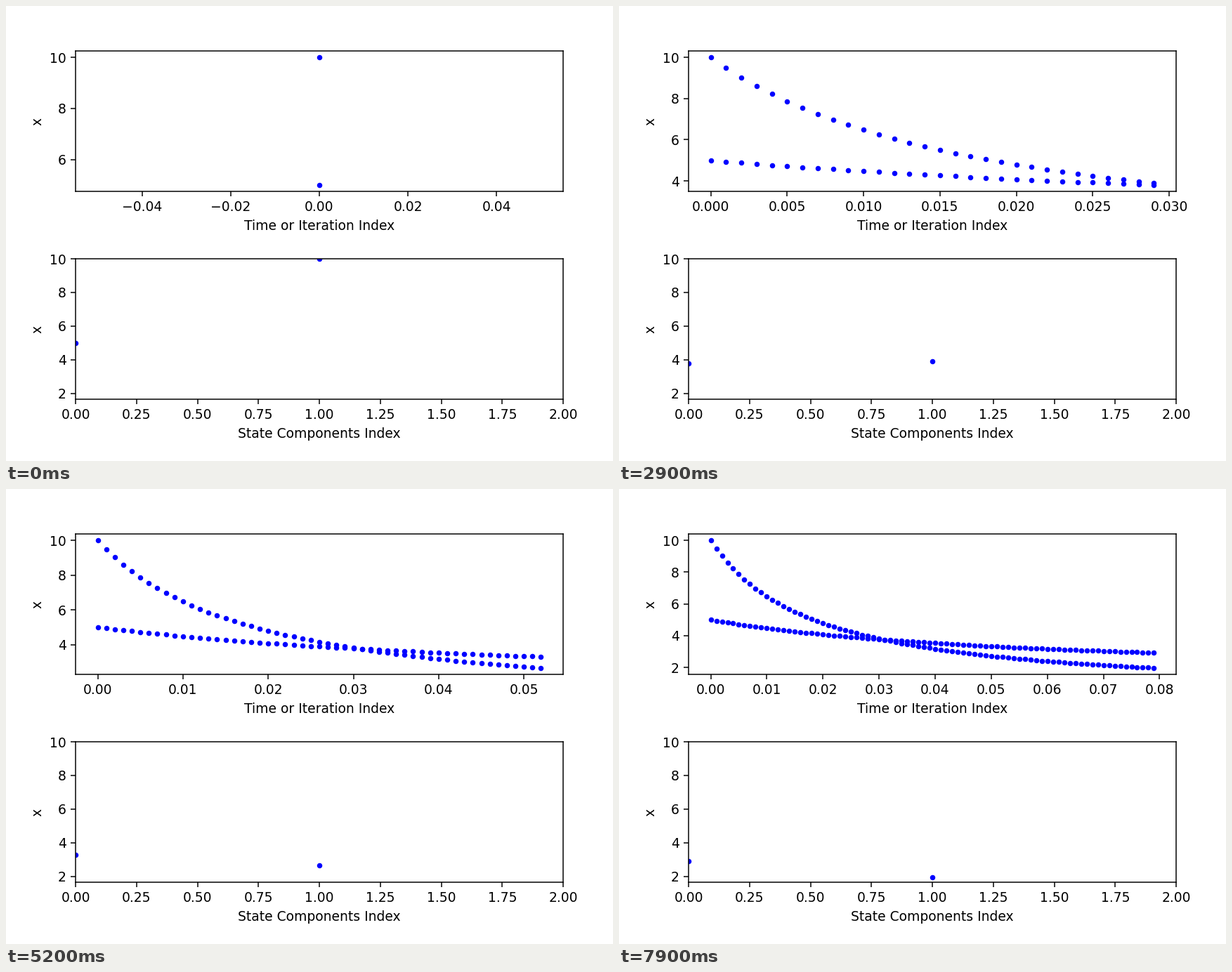
A matplotlib script for the animation above (8000 ms loop, 864 by 648 pixels).

```python
import matplotlib.pyplot as plt
import numpy as np
from matplotlib.animation import FuncAnimation

W, H, DPI = 864, 648, 135
FRAMES, INTERVAL = 80, 100
STEPS, DT = 100, 0.001


def simulate():
    """Forward Euler on two competing populations."""
    x = np.empty((STEPS + 1, 2))
    x[0] = 5, 10
    for n in range(STEPS):
        a, b = x[n]
        rate = np.array([8 - 4 * a, 8.57 - 3 * a - 4.5 * b])
        x[n + 1] = x[n] * (1 + DT * rate)
    return x


def add_panel(bottom, xlabel):
    ax = fig.add_axes([99 / W, bottom / H, 694 / W, 200 / H])
    ax.set_xlabel(xlabel)
    ax.set_ylabel("x")
    return ax


states = simulate()
times = np.arange(STEPS + 1) * DT

plt.rcParams["font.family"] = "DejaVu Sans"
fig = plt.figure(figsize=(W / DPI, H / DPI), dpi=DPI, facecolor="white")

history = add_panel(384, "Time or Iteration Index")
current = add_panel(88, "State Components Index")
current.set_xlim(0, 2)
current.set_ylim(states.min(), states.max())

trails = [history.plot([], [], "b.")[0] for _ in range(2)]
points, = current.plot([], [], "b.")


def update(n):
    for i, trail in enumerate(trails):
        trail.set_data(times[:n + 1], states[:n + 1, i])
    history.relim()
    history.autoscale_view()
    points.set_data([0, 1], states[n])
    return [*trails, points]


anim = FuncAnimation(fig, update, frames=FRAMES, interval=INTERVAL,
                     init_func=lambda: update(0), repeat=True,
                     repeat_delay=0, blit=False)
plt.show()
```
